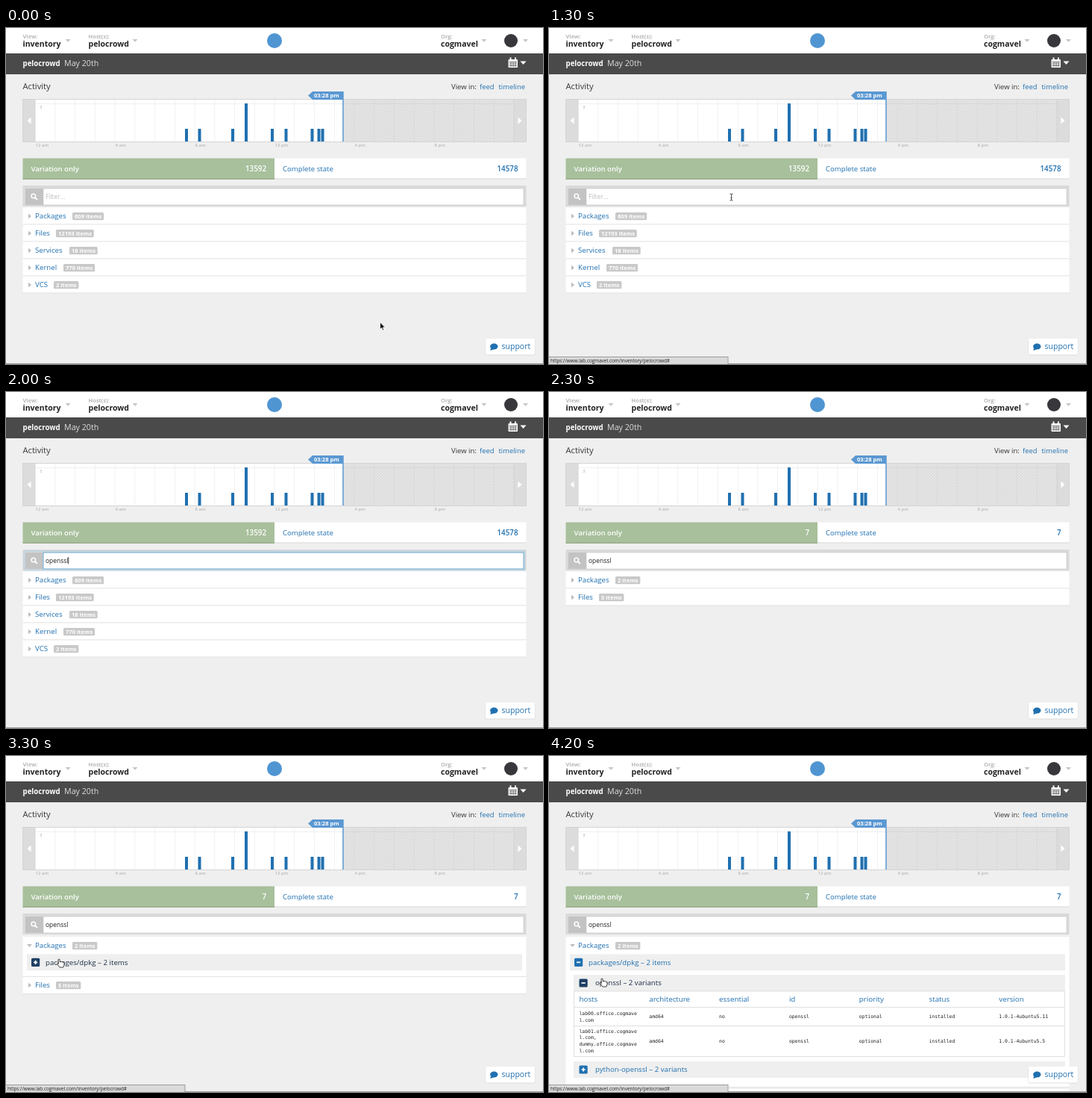
An HTML page for the animation above (6200 ms loop, 720x450 px).

```html
<!DOCTYPE html>
<html lang="en">
<head>
<meta charset="utf-8">
<title>Inventory search</title>
<style>
html, body { margin: 0; width: 100%; height: 100%; overflow: hidden; background: #efefef; }
svg { display: block; width: 720px; height: 450px; }
text { font-family: "Open Sans", "Noto Sans", sans-serif; white-space: pre; }
.mono { font-family: "DejaVu Sans Mono", monospace; }
</style>
</head>
<body>
<svg viewBox="0 0 720 450">
  <defs>
    <pattern id="hatch" width="4" height="4" patternUnits="userSpaceOnUse">
      <rect width="4" height="4" fill="#e4e4e4"/>
      <path d="M-1 5L5 -1M-1 1L1 -1M3 5L5 3" stroke="#d3d3d3" stroke-width=".7"/>
    </pattern>
  </defs>
  <g id="base"></g>
  <g id="live"></g>
</svg>
<script>
const LOOP = 6200;
const ORG = "cogmavel", HOST = "pelocrowd";
const BLUE = "#2070b0", NAVY = "#1d3f63", ROW = "#efefef";

const rect = (x, y, w, h, fill, more = "") =>
  `<rect x="${x}" y="${y}" width="${w}" height="${h}" fill="${fill}" ${more}/>`;
const path = (d, fill, more = "") => `<path d="${d}" fill="${fill}" ${more}/>`;
const text = (x, y, s, size, fill, weight = 500, more = "") =>
  `<text x="${x}" y="${y}" font-size="${size}" fill="${fill}" font-weight="${weight}" ${more}>${s}</text>`;
const END = 'text-anchor="end"';
const caret = (x, y, fill, w = 3.5, h = 4) => path(`M${x - w} ${y}h${2 * w}l${-w} ${h}z`, fill);

function menu(x, label, value, arrowX) {
  return text(x, 14, label, 7.5, "#b8b8b8", 700) +
    text(x, 25, value, 10.5, "#222", 700) + caret(arrowX, 15, "#c8c8c8");
}

function header() {
  let s = rect(0, 0, 720, 34, "#fff") + rect(0, 34, 720, 28, "#4a4a4a");
  s += menu(22.5, "View:", "inventory", 83) + menu(110.5, "Host(s):", HOST, 173) + menu(583, "Org:", ORG, 641);
  s += '<circle cx="360" cy="17" r="10" fill="#4f95d2"/><circle cx="677" cy="17" r="9" fill="#38383c"/>';
  s += caret(696.5, 15, "#c8c8c8");
  s += text(22.5, 51, HOST, 9.7, "#fff", 700) + text(78, 51, "May 20th", 10.7, "#dedede", 400);
  // calendar
  s += rect(673.5, 42, 12.5, 11, "#fff", 'rx="1"') + rect(675.5, 39.5, 2, 4, "#fff") + rect(682, 39.5, 2, 4, "#fff");
  s += path("M674.5 45.5h10.5M674.5 48h10.5M674.5 50.5h10.5M677 45v7M680 45v7M683 45v7", "none",
    'stroke="#4a4a4a" stroke-width=".7"');
  return s + caret(693.5, 44.5, "#fff", 4, 4.5);
}

function chart() {
  let s = text(22.5, 82, "Activity", 11.2, "#3a3a3a");
  s += text(597, 82, "View in:", 9.5, "#333") + text(635, 82, "feed", 9.4, BLUE) + text(660.5, 82, "timeline", 9.4, BLUE);
  s += rect(22.5, 95.5, 675, 57, "#dcdcdc") + rect(39, 96, 413, 56, "#fff") + rect(452, 96, 229, 56, "url(#hatch)");
  for (let h = 1; h < 24; h++) s += rect(38.7 + h * 26.75, 96, .7, 56, h < 16 ? "#ececec" : "#d6d6d6");
  s += rect(39, 101, 413, .7, "#e8e8e8") + rect(452, 101, 229, .7, "#d3d3d3");
  s += rect(22.5, 95.5, 675, 57, "none", 'stroke="#d0d0d0" stroke-width=".8"');
  s += path("M39 96v56M681 96v56", "none", 'stroke="#cfcfcf" stroke-width=".8"');
  s += path("M33.5 119.5v9l-5-4.5zM686.5 119.5v9l5-4.5z", "#fff");
  s += text(45, 107.5, "3", 6, "#aaa");
  for (const x of [240, 257.5, 302, 355, 373.5, 408.5, 417.5, 422.5]) s += rect(x, 135, 4, 17, BLUE);
  s += rect(320, 101, 4, 51, BLUE) + rect(451.2, 85, 1.5, 67, "#5a98d2");
  s += path("M405 90.5L411 85H452V96H411z", "#5a98d2") + text(413, 93.3, "03:28 pm", 7.6, "#fff", 700);
  ["12 am", "4 am", "8 am", "12 pm", "4 pm", "8 pm"].forEach((label, i) =>
    s += text(39.5 + i * 107, 159.3, label, 6, "#b9b9b9", 600));
  return s;
}

function tabs() {
  return rect(22.5, 174.5, 337.5, 28, "#a8c09c") + rect(22.5, 201.5, 337.5, 1.3, "#93ab87") +
    rect(360, 174.5, 337.5, 27, "#fff") + rect(360, 201.5, 337.5, 1, "#dcdcdc") +
    text(33.5, 192, "Variation only", 9.6, "#fff", 600) + text(371, 192, "Complete state", 9.6, BLUE);
}

function filterFrame() {
  return rect(22.5, 211, 675, 28, "#d9d9d9") + rect(26, 215, 24, 22, "#c3c3c3") +
    '<circle cx="36.8" cy="225" r="2.8" fill="none" stroke="#fff" stroke-width="1.5"/>' +
    path("M39 227.2l2.8 2.8", "none", 'stroke="#fff" stroke-width="1.8"') +
    rect(50, 215, 644, 22, "#fff", 'stroke="#cacaca" stroke-width=".7"');
}

function support() {
  return rect(642.5, 416.5, 67, 22, "#ddd", 'rx="3"') + rect(643, 416, 66, 21.5, "#fff", 'rx="2"') +
    '<ellipse cx="654.3" cy="426.5" rx="5.2" ry="4" fill="#2070b0"/>' + path("M650 428l-.5 4 5-2z", BLUE) +
    text(664.5, 430, "support", 10.5, BLUE) + rect(0, 449, 720, 1, "#a0a0a0");
}

function group(y, name, count, badgeX, open, hover) {
  const ink = hover ? NAVY : BLUE, mark = hover ? NAVY : "#bdbdbd";
  return (open ? caret(31.5, y - 2, mark, 3.3, 4) : path(`M30 ${y - 3.2}v6.4l4-3.2z`, mark)) +
    text(39, y + 3.4, name, 9.7, ink) +
    rect(badgeX, y - 5, 29 + 4.35 * String(count).length, 10.2, hover ? NAVY : "#c9c9c9", 'rx="1.5"') +
    text(badgeX + 3, y + 2.9, count + " items", 7.6, "#fff", 700);
}

function item(x, y, label, open, hover, textX) {
  const ink = hover ? NAVY : BLUE, iconX = x + (x < 30 ? 6 : 7.5);
  return rect(x, y - 11, 692 - x, 22, ROW) + rect(iconX, y - 5.6, 11.2, 11.2, ink, 'rx="1.5"') +
    path(`M${iconX + 3} ${y}h5.2` + (open ? "" : `m-2.6 -2.6v5.2`), "none", 'stroke="#fff" stroke-width="1.7"') +
    text(textX, y + 3.4, label, 9.7, hover ? "#1c2f45" : BLUE);
}

function table() {
  const col = i => 40.5 + i * 93.8;
  const cell = (i, y, s) => text(col(i), y + 2.3, s, 6.43, "#222", 400, 'class="mono"');
  let s = rect(33.5, 315, 658, 87.5, "#fff", 'stroke="#d8d8d8" stroke-width=".8"');
  s += rect(33.5, 336, 658, .9, "#ddd") + rect(33.5, 361, 658, .9, "#ddd");
  ["hosts", "architecture", "essential", "id", "priority", "status", "version"].forEach((label, i) =>
    s += text(col(i), 329, label, 9.8, BLUE));
  const hostLines = lab => [`${lab}.office.${ORG.slice(0, 7)}`, `${ORG.slice(7)}.com`];
  const rows = [
    [349, hostLines("lab00"), "11"],
    [381.3, [...hostLines("lab01"), ...hostLines("dummy")], "5"]
  ];
  for (const [y, hosts, patch] of rows) {
    hosts.forEach((h, i) => {
      const comma = hosts.length > 2 && i == 1 ? "," : "";
      s += cell(0, y + (i - (hosts.length - 1) / 2) * 8.6, h + comma);
    });
    ["amd64", "no", "openssl", "optional", "installed", "1.0.1-4ubuntu5." + patch].forEach((v, i) =>
      s += cell(i + 1, y, v));
  }
  return s;
}

// the hovered name is passed down so that its row is drawn dark
function list(t, hover) {
  let s = "";
  const panel = (y, h) => rect(22.5, y, 675, h, "#fff") + rect(22.5, y + h, 675, 1, "#e3e3e3");
  if (t < 3000) {
    const groups = t < 2300
      ? [["Packages", 609, 89], ["Files", 12193, 67], ["Services", 18, 85], ["Kernel", 770, 77], ["VCS", 2, 64]]
      : [["Packages", 2, 89], ["Files", 5, 67]];
    groups.forEach(([name, n, x], i) => s += panel(240.5 + i * 23, 22) + group(252 + i * 23, name, n, x, false, hover == name));
    return s;
  }
  const opening = t < 3100, y = opening ? 253 : 254;
  const filesY = opening ? 305 : t < 3600 ? 307 : t < 4200 ? 369 : 457;
  s += panel(y - 12, filesY - y - (t < 3600 ? 0 : 2)) + panel(filesY - 11, 22);
  s += group(y, "Packages", 2, 89, true, hover == "Packages") + group(filesY, "Files", 5, 67, false, false);
  const dpkg = item(28, y + 22.3, "packages/dpkg – 2 items", t >= 3600, hover == "dpkg", 53);
  s += opening ? `<g opacity=".4">${dpkg}</g>` : dpkg;
  if (t >= 3600) {
    const open = t >= 4200;
    s += item(33, 304, "openssl – 2 variants", open, hover == "openssl", 62);
    if (open) s += table();
    s += item(33, open ? 420 : 332.5, "python-openssl – 2 variants", false, false, 62);
  }
  return s;
}

const shapes = {
  arrow: ["M0 0V9.6L2.2 7.6L3.7 11L5.2 10.3L3.8 7.1H6.8z", "#111", "#fff"],
  hand: ["M1 0C2 0 2.2 1 2.4 4L4 3.4L5.2 4L6.6 3.8L8 5V8L6.8 11H2L-1.6 6.6C-2 5.4-.8 5.2 .4 6.6L0 1Q0 0 1 0z", "#fff", "#111"],
  beam: ["M-2 -4.5Q0 -4.5 0 -3.5Q0 -4.5 2 -4.5M0 -3.5V3.5M-2 4.5Q0 4.5 0 3.5Q0 4.5 2 4.5M-1 1H1", "none", "#222"]
};

// [start, shape, x, y, hovered name, link address shown]
const pointer = [
  [0, "arrow", 501.5, 394],
  [1000, "arrow", 478, 379],
  [1100, "hand", 395, 324, "Kernel", true],
  [1200, "hand", 290, 255, "Packages", true],
  [1300, "beam", 244.5, 226.5, "", true],
  [1400, "beam", 244.5, 226.5],
  [1600, ""],
  [2600, "arrow", 150, 330],
  [2700, "hand", 72, 257.5, "Packages", true],
  [3300, "hand", 70, 272, "dpkg", true],
  [3900, "hand", 70, 298, "openssl", true]
];
const typing = [[1600, "o"], [1700, "op"], [1800, "open"], [1900, "opens"], [2000, "openssl"]];
const at = (steps, t) => steps.filter(step => step[0] <= t).pop();

function live(t) {
  const [, shape, x, y, hover, link] = at(pointer, t);
  const typed = (at(typing, t) || [0, ""])[1];
  const [a, b] = t < 2300 ? [13592, 14578] : [7, 7];
  let s = text(349, 192, a, 9.8, "#fff", 600, END) + text(686.5, 192, b, 9.8, BLUE, 600, END);
  if (t >= 1400 && t < 2300) {
    s += rect(24.5, 213, 671, 25.5, "none", 'stroke="#a9cfe6" stroke-width="2" opacity=".5"');
    s += rect(50, 215, 644, 22, "none", 'stroke="#7db9dc" stroke-width="1.1"');
    s += rect(53 + [0, 5, 10.2, 0, 20.2, 24.2, 0, 30.4][typed.length], 221, .8, 9.5, "#222");
  }
  s += text(53, 228.6, typed || "Filter...", 8.45, typed ? "#222" : "#bcbcbc", 400);
  s += list(t, hover) + support();
  if (link) {
    s += rect(-.5, 440.4, 240.5, 10, "#dadada", 'stroke="#8c8c8c" stroke-width=".8"');
    s += text(2, 447.6, `https://www.lab.${ORG}.com/inventory/${HOST}#`, 6.4, "#222", 400);
  }
  if (shape) {
    const [d, fill, stroke] = shapes[shape];
    s += path(d, fill, `stroke="${stroke}" stroke-width=".8" transform="translate(${x} ${y})"`);
  }
  return s;
}

const baseNode = document.getElementById("base"), liveNode = document.getElementById("live");
baseNode.innerHTML = header() + chart() + tabs() + filterFrame();
let shown = "";
function frame() {
  const next = live(performance.now() % LOOP);
  if (next !== shown) liveNode.innerHTML = shown = next;
  requestAnimationFrame(frame);
}
frame();
</script>
</body>
</html>
```
